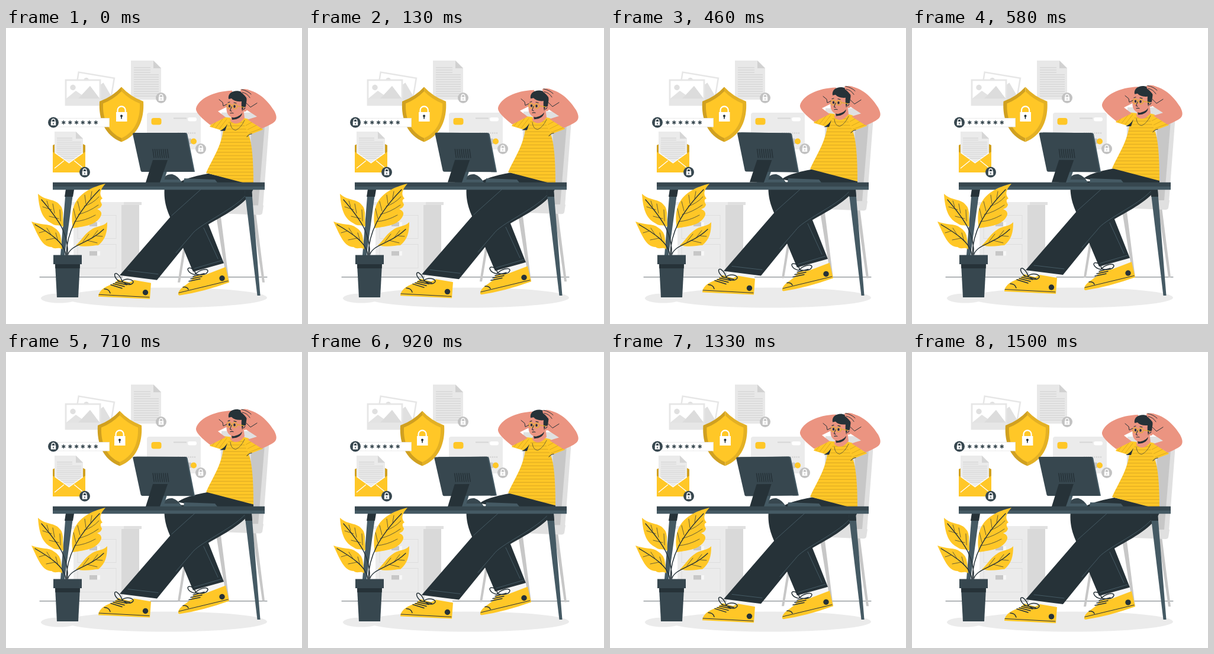
An HTML page that plays this animation: 500x500 px, repeating every 1.54 s.

```html
<!DOCTYPE html>
<html lang="en">
<head>
<meta charset="utf-8">
<title>Secure desk</title>
<style>
  html, body { margin: 0; width: 100%; height: 100%; overflow: hidden; background: #fff; }
  svg { display: block; width: 100vw; height: 100vh; }
  .line { fill: none; stroke: #263238; stroke-linecap: round; stroke-linejoin: round; }
  .seam { fill: none; stroke: #455a64; stroke-linecap: round; }
  .dark { fill: #263238; } .slate { fill: #37474f; } .steel { fill: #455a64; }
  .sun { fill: #ffc727; } .ochre { fill: #d0a020; } .skin { fill: #eb9481; }
  .g1 { fill: #ebebeb; } .g2 { fill: #e0e0e0; } .g3 { fill: #c7c7c7; }
</style>
</head>
<body>
<svg viewBox="0 0 500 500">
  <defs>
    <pattern id="stripes" width="10" height="5.6" patternUnits="userSpaceOnUse">
      <rect width="10" height="5.6" fill="#ffc727"/>
      <path d="M0 3H10" stroke="#d0a020" stroke-width=".9"/>
    </pattern>
    <g id="lock">
      <circle r="9"/>
      <rect x="-4.2" y="-1.5" width="8.4" height="6.5" fill="#fff"/>
      <path d="M-2.8 -1V-3A2.8 2.8 0 0 1 2.8 -3V-1" fill="none" stroke="#fff" stroke-width="1.4"/>
      <path d="M0 .5V3.2" stroke="currentColor" stroke-width="1.4"/>
    </g>
  </defs>

  <g id="floor">
    <ellipse class="g1" cx="270" cy="455.500" rx="171" ry="17"/>
    <ellipse class="g1" cx="90" cy="456.500" rx="31" ry="8"/>
    <path class="line" d="M57 420.800H441" stroke-width=".7"/>
  </g>

  <g id="cabinet">
    <path fill="#d9d9d9" d="M195 298H225V419.500H195Z"/>
    <path class="g1" d="M114 298H195V419.500H114Z"/>
    <path class="g1" d="M108 294H199V299H108Z"/>
    <path class="g2" d="M199 294H229V299H199Z"/>
    <g fill="none" stroke="#dedede"><rect x="121" y="316.500" width="65" height="39"/><rect x="121" y="365.500" width="65" height="40"/></g>
    <path class="g3" d="M141 328H154V335H141ZM141 377H154V384.500H141Z"/>
    <path fill="#f7f7f7" d="M154 328H159V335H154ZM154 377H159V384.500H154Z"/>
  </g>

  <g id="photos">
    <g transform="rotate(9.500 122 73)">
      <rect x="123" y="74.500" width="61" height="40" fill="#fff" stroke="#e6e6e6" stroke-width="2.500"/>
      <circle class="g2" cx="138" cy="86" r="4.500"/>
      <path class="g2" d="M142 112L167 85L183 104V114H142Z"/>
    </g>
    <rect x="101" y="88" width="58" height="42" fill="#fff" stroke="#e6e6e6" stroke-width="2.800"/>
    <circle class="g2" cx="113" cy="100.500" r="4.700"/>
    <path fill="#e3e3e3" d="M102 119L118 106L128 113L142 98L158 119V130H102Z"/>
    <path fill="#dcdcdc" d="M128 113L142 98L158 119H122Z"/>
    <path fill="#e6e6e6" d="M100 119.500H160V131H100Z"/>
  </g>

  <g id="report">
    <path fill="#e8e8e8" d="M211 55H249L262 68V121H211Z"/>
    <path fill="#d1d1d1" d="M249 55L262 68H249Z"/>
    <path id="reportLines" stroke="#d8d8d8" stroke-width="1.700"/>
    <use href="#lock" x="262" y="118" fill="#c2c2c2" color="#c2c2c2"/>
  </g>

  <g id="card">
    <rect class="g1" x="238" y="143" width="91" height="62" rx="4"/>
    <rect class="sun" x="245.500" y="152" width="17" height="11.500" rx="4"/>
    <path stroke="#d6d6d6" stroke-width="2" d="M283 152.500H305"/>
    <rect fill="#fff" x="307" y="151" width="15" height="6.500" rx="3"/>
    <path stroke="#cfcfcf" stroke-width="2" stroke-dasharray="2 1.500" d="M290 177.500H321"/>
    <circle class="g3" cx="310" cy="191.500" r="5"/>
    <circle class="sun" cx="317" cy="191.500" r="5"/>
    <use href="#lock" x="329" y="204" fill="#c2c2c2" color="#c2c2c2"/>
  </g>

  <g id="shield">
    <path class="ochre" d="M195 99.500Q180 116 158 124C156 154 167 182 195 192.500Z"/>
    <path fill="#e3b024" d="M195 99.500Q210 116 232 124C234 154 223 182 195 192.500Z"/>
    <path class="sun" d="M195 107Q181 121 164 127.500C163 153 172 176 195 186C218 176 227 153 226 127.500Q209 121 195 107Z"/>
    <rect x="186" y="142" width="18.500" height="16" fill="#fff"/>
    <path d="M188.500 143V139A6.600 6.600 0 0 1 201.700 139V143" fill="none" stroke="#fff" stroke-width="2.200"/>
    <circle class="dark" cx="195" cy="148.500" r="2"/><path class="line" d="M195 149V153" stroke-width="1.600"/>
  </g>

  <g id="password">
    <rect x="80" y="152.500" width="94.500" height="14.500" fill="#fff" stroke="#e6e6e6" stroke-width=".8"/>
    <text class="slate" x="97.500 108.300 119.100 130 140.900 151.800" y="163.300" text-anchor="middle" font-family="'DejaVu Sans', sans-serif" font-size="9.300">✱✱✱✱✱✱</text>
    <use href="#lock" x="80" y="159.500" fill="#37474f" color="#37474f"/>
  </g>

  <g id="mail">
    <path class="ochre" d="M79 198L83 196H130L134 198V244H79Z"/>
    <path class="g1" d="M82 175H118L130 187V220L106 230L82 217Z"/>
    <path fill="#d6d6d6" d="M118 175L130 187H118Z"/>
    <path id="mailLines" stroke="#d8d8d8" stroke-width="1.300"/>
    <path class="sun" d="M79 209L106.500 228L134 209V244H79Z"/>
    <path d="M83 211L106.500 228L130 211M82 237L98 224M131 237L115 224" fill="none" stroke="#fff" stroke-width="1.300"/>
    <use href="#lock" x="133" y="243.500" fill="#37474f" color="#37474f"/>
  </g>

  <g id="sitter">
    <g id="chair">
      <path class="g3" d="M299 374L303 376L294 430H290ZM354 312H362L377 430H373ZM416 312H422L437 430H433Z"/>
      <path class="g2" d="M364 143H437Q446 150 444 170L434 302H360Z"/>
      <path class="g3" d="M414 166H437L426 300H412Z"/>
      <path class="g2" d="M352 300H435L433 313Q432 316 428 316L352 313Z"/>
    </g>
    <g id="legs">
      <path fill="#f5f5f5" d="M314 404L364 394L370 408L338 419L319 418ZM197 414L246 420L243 433L197 430Z"/>
      <g id="farShoe">
        <path class="sun" d="M291 451C290 441 304 435 312 428L318 419L337 417L371 404L377 430Q333 446 293 452Z"/>
        <path class="line" d="M292 447.500L375 427.500" stroke-width="1"/>
        <circle class="dark" cx="365" cy="423" r="4.700"/>
        <path class="line" stroke-width="1.500" d="M299 438Q306 437 308 442M309 428L328 424M312 424L331 420M316 420L335 415M319 417C306 414 303 403 313 406Q320 410 320 416C326 409 341 405 341 411C339 418 328 418 320 416"/>
      </g>
      <path class="dark" d="M268 268C265 298 276 316 282 331L316 412L368 397.500L342 332L350 268Z"/>
      <path class="seam" stroke-width="1" d="M318 406.500L364 393M334 338L358 390"/>
      <g id="nearShoe">
        <path class="sun" d="M156 454C157 442 170 436 182 432L190 425L208 430L216 426L245 431L243 458Q200 456 157 454Z"/>
        <path class="line" d="M157 450.500L242 455" stroke-width="1"/>
        <circle class="dark" cx="235.500" cy="447" r="4.700"/>
        <path class="line" stroke-width="1.500" d="M166 441Q174 441 176 448M177 434L196 440M181 432L200 437M185 430L204 434M189 428L209 432M194 429C184 426 180 413 187 415Q194 420 196 428C203 422 216 425 215 430C211 436 202 434 196 428"/>
      </g>
      <path class="dark" d="M290 263C303 253 328 249 342 246L418 264V272Q411 288 388 304C360 324 330 335 316 351L255 426L192 418L277 320L328 270Z"/>
      <path class="seam" stroke-width="1" d="M329 273L280 317M206 410L257 416M404 284C380 310 325 332 313 350L287 380"/>
    </g>
    <g id="torso">
      <path fill="url(#stripes)" d="M377 152Q387 163 399 152L434 171L410 181Q418 200 418 266L338 245C348 222 363 202 367 173Z"/>
      <path class="sun" d="M355 149L380 152L367 174L344 167ZM397 151L409 154L434 172L410 181Z"/>
      <path d="M348 167L359 153M354 169L366 154M360 171L373 154M405 165L416 159M408 172L424 164M410 178L431 170" stroke="#d0a020" stroke-width=".8"/>
      <path class="line" stroke-width="1" d="M407 184Q409 180 415 179"/>
      <path class="dark" d="M361 174Q370 170 374 162L370 174Z"/>
      <path class="line" stroke-width="1" d="M379 161Q380 172 388 173Q397 169 403 156" stroke-opacity=".6"/>
    </g>
    <g id="arms">
      <path class="skin" d="M345 164C331 153 320 143 321 136C325 120 350 107 382 106L385 120L374 133L358 141L371 151Z"/>
      <path class="skin" d="M396 104C424 102 443 124 453 140C460 153 456 158 449 162Q440 167 432 170L408 155Q417 152 424 150L404 137Z"/>
    </g>
    <g id="head">
      <path class="skin" d="M381 146L401 136L403 152Q390 168 379 157Z"/>
      <path class="dark" d="M381 149Q391 150 399 143Q398 154 382 155Z"/>
      <path class="skin" d="M375 120Q371 132 373 142Q376 151 385 151.500Q398 149 402 138V118L388 112Z"/>
      <circle class="skin" cx="403" cy="137" r="4.200"/>
      <path class="dark" d="M376 120C374 110 384 105 393 106.500Q407 109 406.500 122L405 133L401 134L399 141Q397 130 398 124Q386 125 381 119Z"/>
      <g fill="none" stroke="#e0b02c" stroke-width="1.200"><circle cx="377" cy="132" r="4"/><circle cx="386.500" cy="132.500" r="4"/><path d="M391 132L402 134"/></g>
      <ellipse class="dark" cx="377.500" cy="132" rx="1.700" ry="2.400"/>
      <ellipse class="dark" cx="386" cy="132.500" rx="1.700" ry="2.400"/>
      <path class="line" stroke-width="1.100" d="M375 126L378 125M385 126L389 127M381 133L378.500 139.500L381 140.500M379 144Q382 143 384 144M401 138L404 135"/>
    </g>
    <g id="hand">
      <path class="skin" d="M396 105Q404 101 413 106L423 121L409 122Q402 112 397 109Z"/>
      <path class="line" stroke-width="1" d="M398 104Q408 106 414 112M399 109Q407 110 412 118M360 121L366 126L367 132L373 129M406 127L413 134L424 127"/>
    </g>
  </g>

  <g id="desk">
    <path class="steel" d="M101 273H114L99 384H92ZM403 273H415L429.500 452H424.500Z"/>
    <path class="dark" d="M101 273H115L113 285H99ZM403 273H415L416 285H404Z"/>
    <path class="slate" d="M263 260Q268 246 281 247Q291 250 297 261Z"/>
    <path class="steel" d="M267 256H293L297 261H265ZM301 254L353 256L357 261H300Z"/>
    <g id="monitor">
      <path class="steel" d="M262 223H278L266 261H248Z"/>
      <path class="steel" d="M220 177H303Q306 177 306.500 180L319 243H309Z"/>
      <path class="slate" d="M217 177H302Q304 177 304.500 180L317 243H230Q228 243 227.500 241L214 179Q214 177 217 177Z"/>
      <path id="vents" class="line" stroke-width="1.500"/>
      <path class="dark" d="M248 223H273L260 261H236Z"/>
    </g>
    <path class="slate" d="M79 260.800H437V268H79Z"/>
    <path class="steel" d="M79 267.800H437V273.300H79Z"/>
  </g>

  <g id="plant">
    <g class="sun">
      <path d="M113 338C109 310 110 277 168 263C160 272 156 280 163 288Q157 290 162 298Q162 303 154 306Q164 310 160 318C152 333 134 335 113 338Z"/>
      <path d="M54 280C66 292 82 288 90 298Q97 304 96 318L97 336C90 331 84 336 77 330C63 323 56 310 54 280Z"/>
      <path d="M43 327C57 333 73 330 81 337Q92 343 93 356L95 374C89 369 83 375 77 370C61 370 54 350 43 327Z"/>
      <path d="M171 328C164 336 151 334 142 342C132 349 128 358 118 367C135 371 147 367 156 367C168 357 171 346 171 328Z"/>
    </g>
    <path class="line" stroke-width="1.400" d="M102 384C102 345 121 311 158 273M104 384C106 350 92 327 60 290M101 384C100 363 73 346 49 332M104 384C109 365 139 365 165 340"/>
    <path class="line" stroke-width=".7" d="M116 327Q133 326 151 316M122 315Q139 311 156 299M132 301Q146 297 157 285M118 322L114 305M125 309L121 293M135 297L133 282M143 288L145 276M92 326L91 307M82 313L79 297M72 302L69 292M89 322L73 318M77 307L62 302M88 360L84 346M76 349L69 338M83 355L68 358M66 343L56 346M130 361L140 348M145 355L155 342M138 359L154 363M152 351L163 352"/>
    <path class="slate" d="M83 399H125L122 455H86Z"/>
    <path class="dark" d="M83 398H125L124.700 406H83.300Z"/>
    <path class="slate" d="M80 383.500H128V399H80Z"/>
  </g>
</svg>
<script>
const PERIOD = 1540;
const el = id => document.getElementById(id);
const rows = (count, make) => Array.from({ length: count }, (_, i) => make(i)).join('');

el('reportLines').setAttribute('d', rows(13, i => `M216 ${67 + i * 4}H${i < 3 ? 244 : 258}`));
el('mailLines').setAttribute('d', rows(11, i => `M86 ${186 + i * 3.4}H${i < 2 ? 112 : 127}`));
el('vents').setAttribute('d', rows(8, i => `M${248 + i * 3.5} 205l2 14`));

// Sideways sway of the shield: [ms, px]
const sway = [[0, 0], [220, 1.8], [290, 1.5], [460, -2], [540, -3.7], [710, -3], [1080, -1.2], [1540, 0]];

// Rise and fall of each body part: height in px, lead in ms
const bobs = {
  chair: [9.5, 80], legs: [9.5, 80], torso: [8.5, 80],
  arms: [7, 80], hand: [7, 80], head: [9.5, 0]
};

function between(keys, t) {
  const i = keys.findIndex(key => key[0] > t);
  const [t0, a] = keys[i - 1], [t1, b] = keys[i];
  return a + (b - a) * (t - t0) / (t1 - t0);
}

const turn = t => t / PERIOD * 2 * Math.PI;
const shift = (id, x, y) => el(id).setAttribute('transform', `translate(${x} ${y})`);

function draw(now) {
  const t = now % PERIOD;
  for (const [id, [height, lead]] of Object.entries(bobs)) {
    shift(id, 0, -height * (1 - Math.cos(turn(t + lead))) / 2);
  }
  shift('shield', between(sway, t), 0);
  el('monitor').setAttribute('transform', `rotate(${0.8 * Math.sin(turn(t))} 266 255)`);
}

const start = performance.now();
(function tick() {
  draw(performance.now() - start);
  requestAnimationFrame(tick);
})();
</script>
</body>
</html>
```
